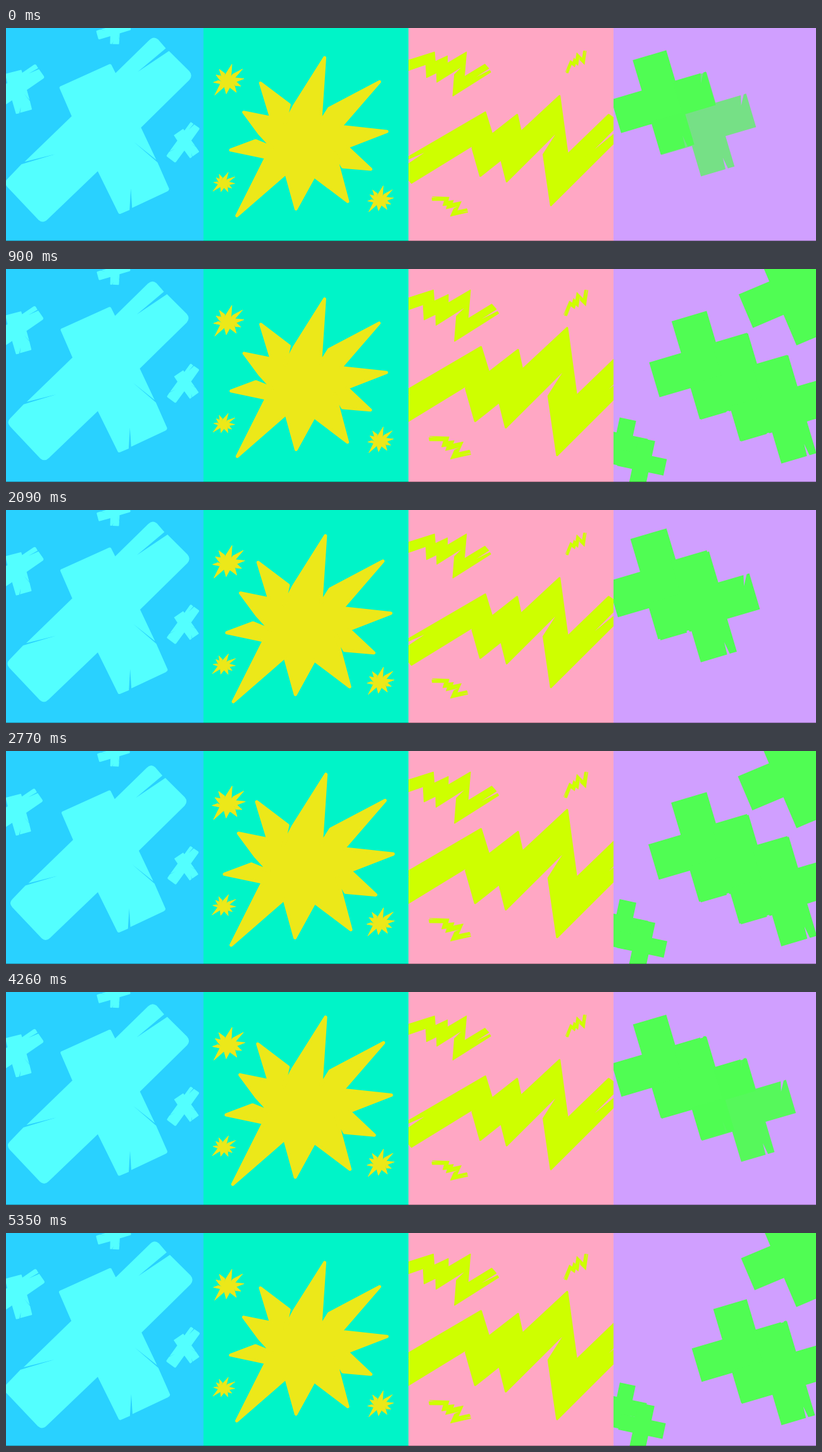
Write an HTML page that moves like this. It is 1280 px wide and 338 px high and loops after 5.41 s.

```html
<!DOCTYPE html>
<html lang="en">
<head>
<meta charset="utf-8">
<title>Pulsing shapes</title>
<style>
html, body { margin: 0; width: 100%; height: 100%; overflow: hidden; }
svg { display: block; }
.panel { overflow: hidden; }
</style>
</head>
<body>
<svg id="stage" width="1280" height="338" viewBox="0 0 1280 338"></svg>
<script>
const LOOP = 5410, CYCLE = 2050, FADE = 100;
const stage = document.getElementById('stage');

function add(parent, tag, attrs) {
  const node = document.createElementNS('http://www.w3.org/2000/svg', tag);
  for (const k in attrs) node.setAttribute(k, attrs[k]);
  return parent.appendChild(node);
}

function panel(x, w, back, fill, line) {
  const p = add(stage, 'svg', { class: 'panel', x, width: w, height: 338, viewBox: `${x} 0 ${w} 338` });
  add(p, 'rect', { x, width: w, height: 338, fill: back });
  return add(p, 'g', { fill, stroke: line ? fill : 'none', 'stroke-width': line, 'stroke-linejoin': 'round' });
}

// One copy of path d: its point (ox, oy) is put at (x, y), then sized and turned
function copy(parent, d, ox, oy, x, y, size = 1, turn = 0) {
  const el = add(parent, 'path', { d });
  const scale = s => el.setAttribute('transform',
    `translate(${x} ${y}) rotate(${turn}) scale(${s * size}) translate(${-ox} ${-oy})`);
  return { el, scale };
}

const blue = panel(0, 312, '#29d1ff', '#53ffff', 0);
const plaster = 'M85 96Q84 93 88 92L163 58Q166 57 167 60L173 72 226 20Q233 13 240 19L252 33 208 70 257 37 289 69Q295 76 289 83L213 158 237 209 202 181 239 213 257 254Q258 257 254 259L199 285 197 254 195 288 181 294Q178 295 177 292L145 227 66 303Q59 310 52 304L3 252Q-3 245 3 239L25 216 78 200 30 212 104 140Z';
const plasters = [
  [147, 162],
  [13.5, 96, .295, 10],
  [170, 4, .16, 28],
  [280, 181.5, .2, -10]
].map(place => copy(blue, plaster, 147, 162, ...place));

const teal = panel(312, 324, '#00f4c8', '#ece819', 5);
const star = 'M504 45L497 149 511 127 592 84 530 156 604 164 540 189 578 225 533 221 520 198 541 277 487 236 458 289 442 231 363 300 410 206 353 194 393 179 420 190 399 167 374 133 418 142 401 86 447 121 440 152 455 123Z';
const stars = [
  [478.5, 172],
  [352, 82, .195],
  [345, 245, .135, 10],
  [592, 271, .165]
].map(place => copy(teal, star, 478.5, 172, ...place));

const pink = panel(636, 324, '#ffa7c4', '#ceff00', 3);
const bolt = 'M616 214L756 132 767 168 808 136 814 164 877 105 890 201 957 136 975 149 914 211 981 156 986 161 863 284 851 201 879 157 791 245 782 209 748 236 735 190 740 183 636 247 618 226 671 190Z';
const bolts = [
  [800, 195],
  [689, 67, .42, 12.6],
  [901, 54, .13, -37],
  [701, 281, .17, 32]
].map(place => copy(pink, bolt, 800, 195, ...place));

const purple = panel(960, 320, '#d09fff', '#50fd53', 0);
const plus = 'M-28-79H28V-28H79V28H28V79H-28V28H-79V-28H-28Z';
const torn = 'M-28-79H28V-28H70L66-12 75-28H79V28H28V79H17L14 60 13 79H-28V28H-79V-28H-28Z';
// Crosses appear one after another; the first value is when each one leaves
const chain = [600, 1040, 1270, 1330].map((end, i) =>
  [end, torn, 1039 + 63.6 * i, 118 + 34.8 * i, 1, -16.5]);
const crosses = [
  ...chain,
  [1330, plus, 1244, 35, 1, -23],
  [1552, plus, 975, 275, .46, 12],
  [1750, plus, 1005, 307, .46, 12]
].map(([end, d, ...place], i) => ({
  start: 1846 + 135 * i, end, ...copy(purple, d, 0, 0, ...place)
}));

add(stage, 'rect', { y: 337, width: 1280, height: 1, opacity: .3 });

const wave = (t, peak, span) => Math.cos(2 * Math.PI * (t - peak) / span);
const clamp = (v, low, high) => Math.max(low, Math.min(high, v));

function presence(t, start, end) {
  const wrap = v => (v % CYCLE + CYCLE) % CYCLE;
  const age = wrap(t - start), life = wrap(end - start);
  return clamp(Math.min(age, life + FADE - age) / FADE, 0, 1);
}

function draw(t) {
  const pulse = (group, s) => group.forEach(g => g.scale(s));
  pulse(plasters, .978 + .041 * wave(t, 545, 479));
  pulse(stars, 1.022 + .047 * wave(t, 3250, LOOP));
  pulse(bolts, 1.048 + .078 * clamp(2.2 * wave(t, 900, CYCLE), -1, 1));
  pulse(crosses, 1.018 + .044 * wave(t, 2000, LOOP));
  for (const c of crosses) c.el.setAttribute('opacity', presence(t, c.start, c.end));
}

const begin = performance.now();
function tick() {
  draw((performance.now() - begin) % LOOP);
  requestAnimationFrame(tick);
}
tick();
</script>
</body>
</html>
```
